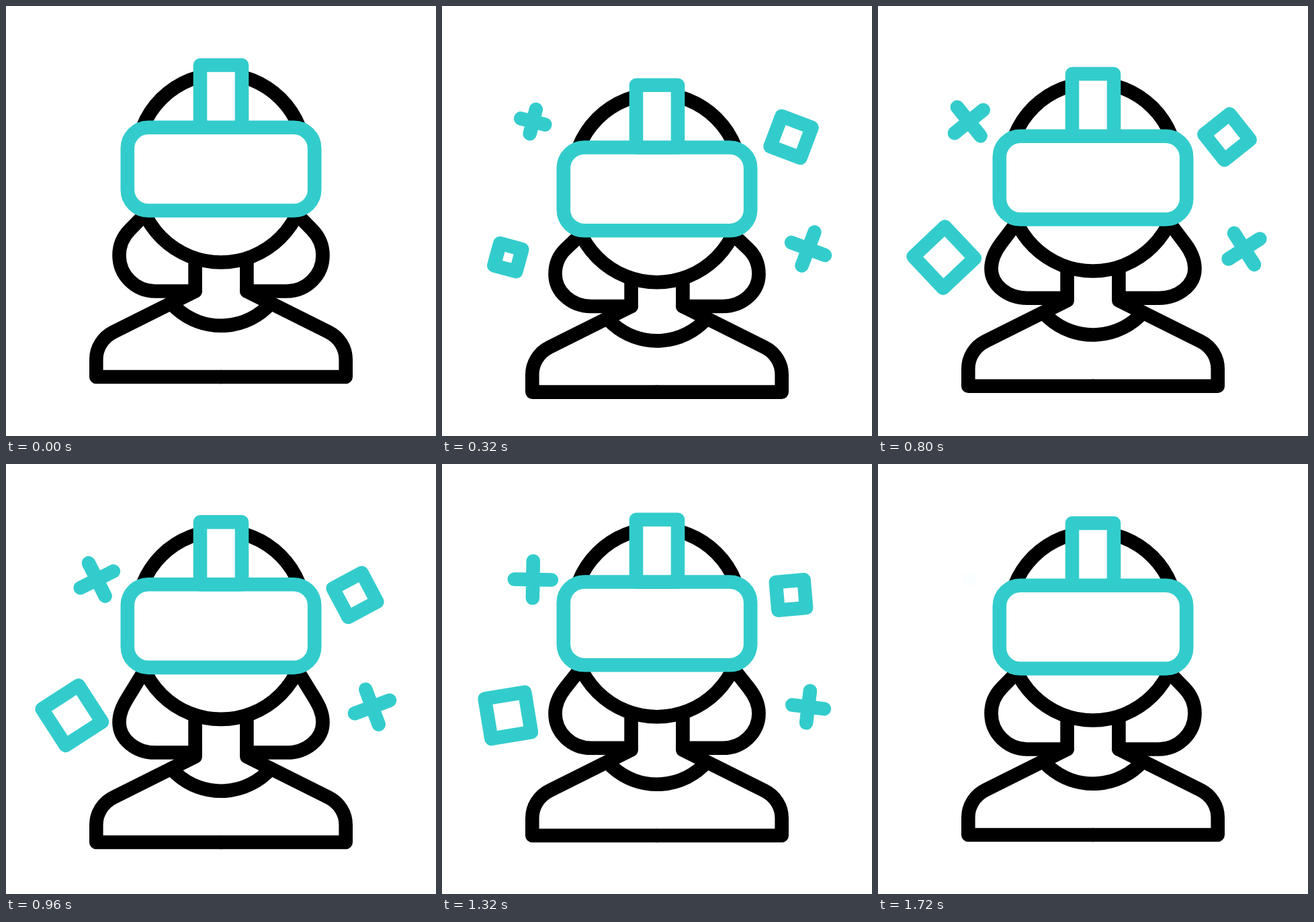
An HTML page with a canvas for the animation above (1.76 s loop, 640 by 640 pixels).

```html
<!DOCTYPE html>
<html lang="en">
<head>
<meta charset="utf-8">
<title>VR headset</title>
<style>
  html, body { margin: 0; width: 100%; height: 100%; overflow: hidden; background: #fff; }
  canvas { display: block; width: 640px; height: 640px; }
</style>
</head>
<body>
<canvas id="stage" width="640" height="640"></canvas>
<script>
const ctx = document.getElementById('stage').getContext('2d');
const LOOP = 1760, STEP = 40, SIZE = 640;
const CYAN = '#33cccc', BLACK = '#000', WHITE = '#fff';
const LINE = 20.6;

// Vertical offsets as [ms, px]
const headKeys = [[0, 0], [320, 29.7], [540, 46.8], [560, 46.5], [800, 13], [1120, -10.5], [1160, -11.1], [1320, -5.3], [1640, 0]];
const bodyKeys = [[0, 0], [320, 22.6], [490, 29.2], [560, 28.7], [800, 13.7], [1120, 8.5], [1320, 1], [1440, 0]];
const curlKeys = [[0, 0], [320, 28], [550, 43], [800, 20], [1120, 8], [1320, 0.3], [1480, 0]];
const hemKeys = [[0, 0], [320, 22.5], [490, 29], [560, 28.5], [800, 10.2], [1120, 1.5], [1320, -1.7], [1640, 0]];

// enter/leave: [start, end] of the scale change; spin in degrees per ms from zeroAt
const bits = [
  { shape: cross, x: 135.3, y: 172, size: 27.5, spin: 0.0767, zeroAt: 134, enter: [134, 434], leave: [1380, 1680] },
  { shape: cross, x: 545, y: 361.5, size: 27.8, spin: 0.0762, zeroAt: 48, enter: [40, 358], leave: [1250, 1550] },
  { shape: square, x: 98.3, y: 374.2, size: 32.3, spin: 0.0655, zeroAt: 88, enter: [160, 468], leave: [1273, 1573] },
  { shape: square, x: 519.5, y: 195, size: 24.3, spin: 0.0645, zeroAt: 0, enter: [0, 340], leave: [1250, 1550] }
];

const ramp = (t, a, b) => Math.min(1, Math.max(0, (t - a) / (b - a)));
const smooth = x => x * x * (3 - 2 * x);

// Monotone cubic through the keys, flat at ends and turning points
function curve(keys, t) {
  const last = keys.length - 1;
  if (t >= keys[last][0]) return keys[last][1];
  const slope = i => (keys[i + 1][1] - keys[i][1]) / (keys[i + 1][0] - keys[i][0]);
  const tangent = i => {
    if (i === 0 || i === last) return 0;
    const a = slope(i - 1), b = slope(i);
    return a * b <= 0 ? 0 : 2 * a * b / (a + b);
  };
  let i = 0;
  while (t >= keys[i + 1][0]) i++;
  const span = keys[i + 1][0] - keys[i][0];
  const u = (t - keys[i][0]) / span, s = smooth(u);
  return keys[i][1] * (1 - s) + keys[i + 1][1] * s
    + span * u * (1 - u) * (tangent(i) * (1 - u) - tangent(i + 1) * u);
}

function cross(r) {
  ctx.moveTo(0, -r);
  ctx.lineTo(0, r);
  ctx.moveTo(-r, 0);
  ctx.lineTo(r, 0);
}

function square(r) {
  ctx.rect(-r, -r, 2 * r, 2 * r);
}

function drawBit(bit, t) {
  const [inStart, inEnd] = bit.enter, [outStart, outEnd] = bit.leave;
  const alpha = ramp(t, inStart, inStart + 100) * (1 - ramp(t, outEnd - 80, outEnd + 43));
  if (alpha <= 0) return;
  const scale = smooth(ramp(t, inStart, inEnd)) * (1 - smooth(ramp(t, outStart, outEnd)));
  ctx.save();
  ctx.globalAlpha = alpha;
  ctx.strokeStyle = CYAN;
  ctx.translate(bit.x, bit.y);
  ctx.rotate((t - bit.zeroAt) * bit.spin * Math.PI / 180);
  ctx.beginPath();
  bit.shape(Math.max(0.02, bit.size * scale));
  ctx.stroke();
  ctx.restore();
}

function mirrored(draw) {
  for (const side of [1, -1]) {
    ctx.save();
    ctx.translate(320, 0);
    ctx.scale(side, 1);
    ctx.translate(-320, 0);
    ctx.beginPath();
    draw();
    ctx.stroke();
    ctx.restore();
  }
}

function drawHair(head, curl, hem) {
  const top = { x: 203, y: 314 + head };
  const bend = { x: 184.2 - 0.15 * (curl - head), y: 333.2 + curl };
  const sideX = 168.5, sideY = 371 + curl, low = 424.5 + hem;
  const dx = bend.x - top.x, dy = bend.y - top.y, k = 14.2 / Math.hypot(dx, dy);
  mirrored(() => {
    ctx.moveTo(top.x, top.y);
    ctx.lineTo(bend.x, bend.y);
    ctx.bezierCurveTo(bend.x + dx * k, bend.y + dy * k, sideX, sideY - 14.2, sideX, sideY);
    ctx.bezierCurveTo(sideX, sideY + 0.552 * (low - sideY), 192.5, low, 222, low);
    ctx.lineTo(281.6, low);
  });
}

function drawBody(head, body) {
  mirrored(() => {
    ctx.moveTo(281.6, 381 + head);
    ctx.lineTo(281.6, 424.5 + body);
    ctx.lineTo(160, 485.3 + body);
    ctx.bezierCurveTo(144, 493.3 + body, 134.3, 509 + body, 134.3, 526 + body);
    ctx.lineTo(134.3, 552 + body);
    ctx.lineTo(320, 552 + body);
  });
  const end = Math.atan2(65.8, 74);
  ctx.beginPath();
  ctx.arc(320, 376.8 + body, 99, end, Math.PI - end);
  ctx.stroke();
}

function drawHead(y) {
  const paint = () => { ctx.fill(); ctx.stroke(); };
  ctx.save();
  ctx.translate(0, y);
  ctx.fillStyle = WHITE;
  ctx.beginPath();
  ctx.arc(320, 226.5, 125.3, Math.PI, 0);
  ctx.arc(320, 256.2, 125.3, 0, Math.PI);
  ctx.closePath();
  paint();

  ctx.strokeStyle = CYAN;
  ctx.beginPath();
  ctx.roundRect(180.8, 180.8, 278.4, 123.7, 31);
  paint();
  ctx.beginPath();
  ctx.rect(289, 88, 62, 92.8);
  paint();
  ctx.restore();
}

function draw(t) {
  ctx.fillStyle = WHITE;
  ctx.fillRect(0, 0, SIZE, SIZE);
  ctx.lineWidth = LINE;
  ctx.lineCap = ctx.lineJoin = 'round';
  ctx.strokeStyle = BLACK;
  const head = curve(headKeys, t), body = curve(bodyKeys, t);
  drawHair(head, curve(curlKeys, t), curve(hemKeys, t));
  drawBody(head, body);
  drawHead(head);
  for (const bit of bits) drawBit(bit, t);
}

const start = performance.now();
function tick() {
  const t = (performance.now() - start) % LOOP;
  draw(Math.floor(t / STEP) * STEP);
  requestAnimationFrame(tick);
}
tick();
</script>
</body>
</html>
```
